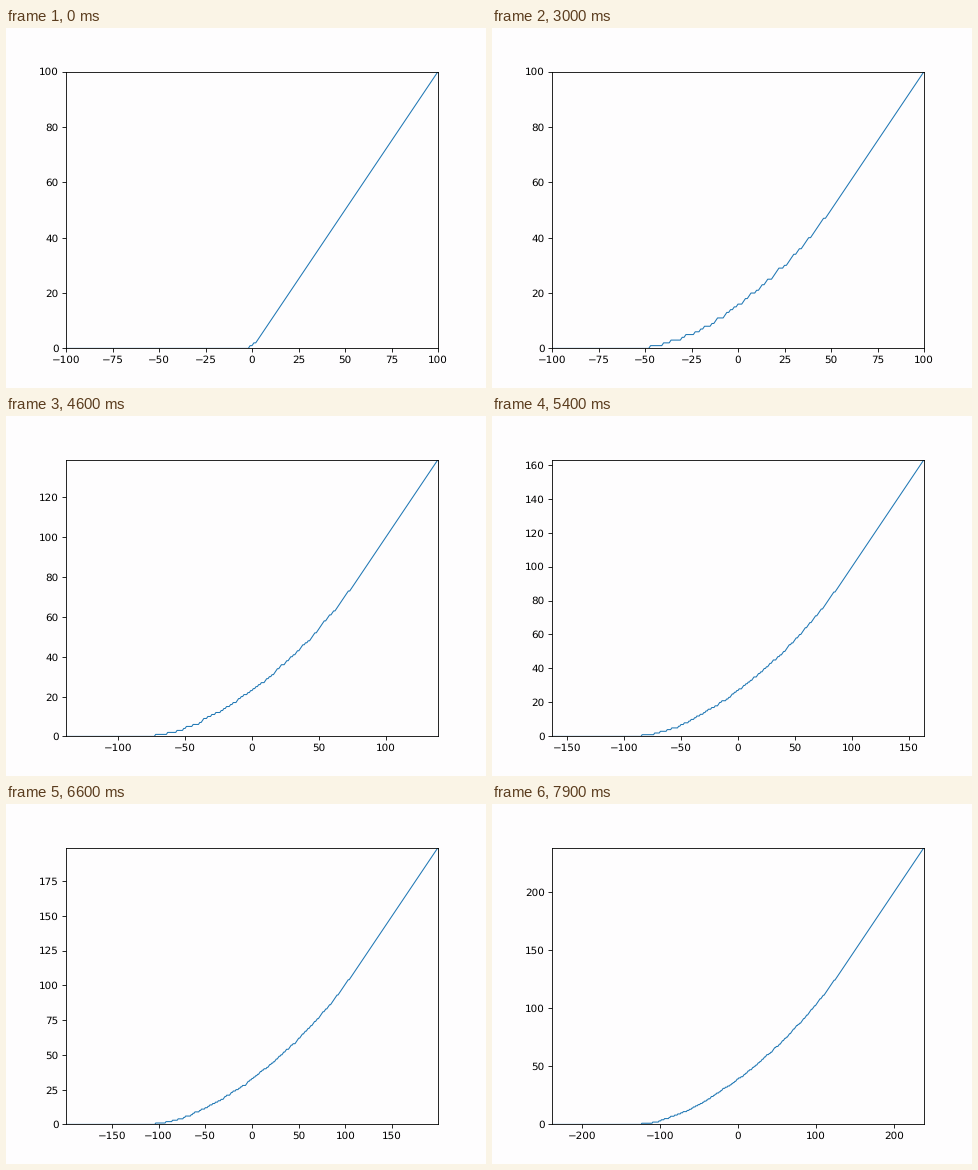
Animation, 480 px wide and 360 px high, one loop 8 s. Source, as a matplotlib script:

```python
import numpy as np
import matplotlib.pyplot as plt
from matplotlib.animation import FuncAnimation

FRAMES, INTERVAL = 80, 100
SUBSTEPS = 3
SPEED = 1.55     # how far each front moves per frame
P = 0.6          # sets how round the limiting arc is
PAPER = "#fefdfe"
X = np.arange(-260, 261)


def arc(t):
    """Limiting profile: an elliptic arc between the two straight fronts."""
    front = SPEED * (t + 1)
    n = front / P
    inside = np.abs(X) < front
    root = np.sqrt((1 - P) * np.maximum(n**2 - X**2 / P, 0))
    return np.where(inside, (X + n - root) / 2, np.maximum(X, 0)), inside


def grow():
    """Corner growth: local minima fill at random, kept close to the arc."""
    rng = np.random.default_rng(7)
    h = np.maximum(X, 0)
    h[np.abs(X) <= 1] += 1
    rows = [h]
    for step in range(1, (FRAMES - 1) * SUBSTEPS + 1):
        aim, inside = arc(step / SUBSTEPS)
        d = np.diff(h)
        corner = np.zeros(X.size, bool)
        corner[1:-1] = (d[:-1] == 0) & (d[1:] == 1)
        chance = np.clip(0.6 + 0.4 * (aim - h), 0, 1)
        h = h + (corner & inside & (rng.random(X.size) < chance))
        if step % SUBSTEPS == 0:
            rows.append(h)
    return rows


heights = grow()

plt.rcParams["text.hinting"] = "none"
fig, ax = plt.subplots(figsize=(6.4, 4.8), dpi=75, facecolor=PAPER)
fig.subplots_adjust(top=0.879)
ax.set_facecolor(PAPER)
line, = ax.plot([], [], color="#1f77b4", lw=1)


def update(i):
    size = max(100, 3 * i + 1)
    shown = np.abs(X) <= size
    line.set_data(X[shown], heights[i][shown])
    ax.set_xlim(-size, size)
    ax.set_ylim(0, size)
    return line,


anim = FuncAnimation(fig, update, frames=FRAMES, interval=INTERVAL,
                     repeat=True, repeat_delay=0)
plt.show()
```
